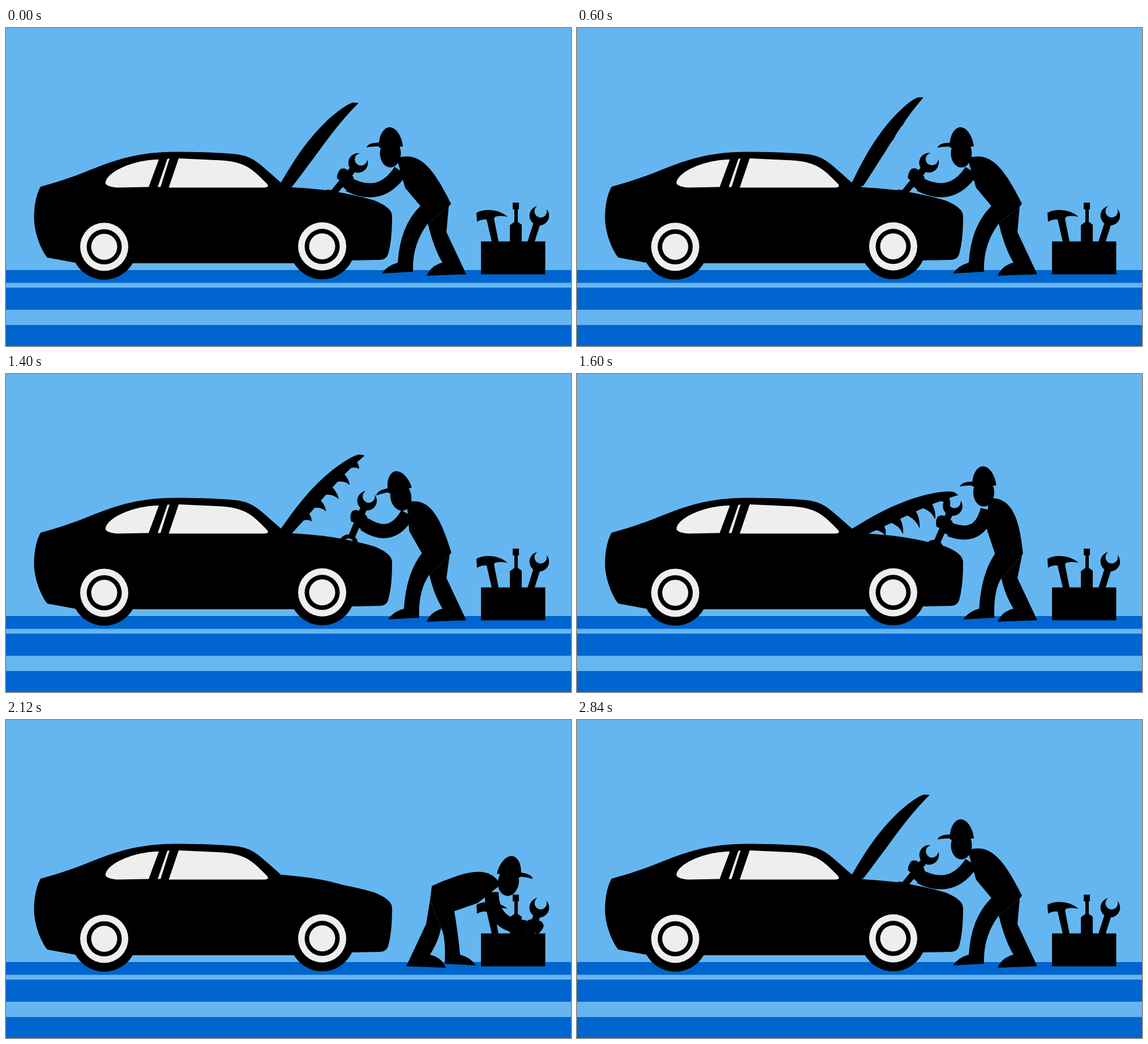
These frames come from a looping animation (998 by 561 pixels, 2.88 s). An HTML page:

```html
<!DOCTYPE html>
<html lang="en">
<head>
<meta charset="utf-8">
<title>Car repair</title>
<style>
  html, body { margin: 0; width: 100%; height: 100%; overflow: hidden; background: #65b6f0; }
  svg { display: block; width: 100%; height: 100%; }
  .road { fill: #0065ce; }
  .light { fill: #eee; }
</style>
</head>
<body>
<svg viewBox="0 0 998 561">
  <defs>
    <g id="wrench">
      <path d="M-8.6 -15A17.3 17.3 0 1 0 8.6 -15A11 11 0 1 1 -8.6 -15Z"/>
      <path d="M-6 13H6V69H-6Z"/>
      <circle cy="83" r="13.2" fill="none" stroke="#000" stroke-width="7"/>
    </g>
    <g id="wheel">
      <circle r="58"/>
      <circle r="42.5" class="light"/>
      <circle r="31"/>
      <circle r="23" class="light"/>
    </g>
  </defs>

  <rect width="998" height="561" fill="#65b6f0"/>
  <path class="road" d="M0 427H998V449.500H0ZM0 458H998V497H0ZM0 524H998V561H0Z"/>

  <path d="M61 280C105 268 130 258 160 246C205 228 250 218 300 218.500C340 218.500 380 220 405 222.500
    C440 226 450 243 489 275.500L505 281C550 283 600 289 650 304C668 311 682 320 682 332C682 365 679 385 675 399
    Q672 408 662 409L612 410L509 415H225L122 414L73 405C62 392 49 360 49.500 333Q50 300 61 280Z"/>
  <path class="light" d="M176 271C180 254 222 233 270 232L252 280.500L196 281.500C182 280 174 277 176 271Z
    M285 231L289 230L273 280.500H268ZM305 230L370 233C420 235 432 245 461 275Q466 281 457 281.500H287.500Z"/>
  <use href="#wheel" x="173.500" y="386"/>
  <use href="#wheel" x="558.500" y="385.300"/>

  <g id="hood">
    <path d="M0 -1C25 -7 50 -13 80 -16.500C105 -19 130 -20 153 -17C172 -15 187 -11 191.500 -7L197 0
      C150 -1 113 5 75 10C50 13 30 16 9 18L0 10Z"/>
    <path id="teeth"/>
  </g>

  <path d="M839 376.500H952.500V434.500H839Z"/>
  <path d="M831 326Q840 321 852 321Q872 321 886 333Q872 330 864 333L862 336L870 377H858L849 338Q840 337 832 342Z"/>
  <path d="M895 308H906V320H904V342L911 347V377H890V348L898 342V320H895Z"/>
  <use href="#wrench" transform="translate(942 331) rotate(17.500)"/>

  <g id="man">
    <path id="torso"/>
    <path id="frontLeg"/>
    <path id="backLeg"/>
    <path id="arm" fill="none" stroke="#000" stroke-width="25"/>
    <g id="head">
      <ellipse rx="18.500" ry="25"/>
      <path d="M-20 -10C-22 -30 -12 -46 -1 -46C13 -45 21 -25 22 -12L-18 -10Z"/>
      <path d="M-42 -10C-40 -17 -31 -19 -17 -19V-12C-28 -12 -35 -12 -42 -10Z"/>
    </g>
    <g id="tool">
      <use href="#wrench"/>
      <path d="M-17 28Q-13 21 -6 22L8 24Q16 28 17 38L14 50H3L-1 44L-11 45Q-18 38 -17 28Z"/>
    </g>
  </g>
</svg>

<script>
const LOOP = 2880;
const MIRROR = 'translate(1520 0) scale(-1 1)';
const set = (id, name, value) => document.getElementById(id).setAttribute(name, value);
const place = ([x, y, angle]) => `translate(${x} ${y}) rotate(${angle})`;

const linear = p => p;
const smooth = p => (1 - Math.cos(Math.PI * p)) / 2;
const speedUp = p => p * p;

function mix(a, b, p) {
  if (typeof a === 'number') return a + (b - a) * p;
  if (Array.isArray(a)) return a.map((v, i) => mix(v, b[i], p));
  return Object.fromEntries(Object.keys(a).map(k => [k, mix(a[k], b[k], p)]));
}

// Head and tool are x, y, angle; foot is the x of the front toe.
const working = { head: [679, 221, 0], tool: [622, 238, 39.5], hip: [759, 312], foot: 664 };
const leaning = { head: [666, 228, -28], tool: [599, 209, 22.6], hip: [757, 314], foot: 664 };
const recoiling = { head: [718, 209, 0], tool: [663, 233, 23.6], hip: [763, 317], foot: 682 };
const standing = { head: [741, 201, 0], tool: [689, 236, 13.3], hip: [764, 317], foot: 693 };
const bending = { head: [632.5, 285.5, -7], tool: [578, 331, -17.5], hip: [748, 315], foot: 690 };
const upright = mix(working, standing, 1.25);

// Each key: time, value, easing on the way to that value.
const manTrack = [
  [0, working], [290, leaning, smooth], [570, working, smooth], [1000, leaning, smooth],
  [1140, leaning], [1600, recoiling, smooth], [1680, upright], [2100, bending, smooth],
  [2140, bending], [2400, upright, smooth], [2520, standing], [2840, working, smooth], [LOOP, working]
];
const hoodTrack = [
  [0, -46], [1000, -52.5, smooth], [1140, -52.5], [1800, 18.5, speedUp],
  [2240, 18.5], [2480, -46, smooth], [LOOP, -46]
];
const teethTrack = [[0, 0], [500, 0], [1600, 1, p => p ** 1.5], [2000, 1], [2001, 0], [LOOP, 0]];

function sample(track, t) {
  const i = track.findIndex(key => key[0] > t);
  const [t0, a] = track[i - 1], [t1, b, ease = linear] = track[i];
  return mix(a, b, ease((t - t0) / (t1 - t0)));
}

function tooth(i, size) {
  const x = 43 + 31 * i, base = 13 - 3.5 * i;
  const tip = x + 9 * size, h = (29 - 3.2 * (i - 2) ** 2) * size;
  return `M${x - 6} ${base}Q${tip - 2} ${base + 0.35 * h} ${tip} ${base + h}` +
    `Q${tip + 6} ${base + 0.5 * h} ${x + 12} ${base - 3}Z`;
}

const shift = ([x, y], dx, dy) => [x + dx, y + dy];

// Point at a distance along the direction u and to its right.
const offset = ([x, y], [ux, uy], along, right) => [x + ux * along - uy * right, y + uy * along + ux * right];

function direction([x0, y0], [x1, y1]) {
  const length = Math.hypot(x1 - x0, y1 - y0);
  return [(x1 - x0) / length, (y1 - y0) / length];
}

function drawMan({ head, tool, hip, foot }) {
  set('head', 'transform', place(head));
  set('tool', 'transform', place(tool));

  // The torso keeps its shape along the spine; the belt tips when he leans far.
  const neck = shift(offset(head, direction(head, hip), 8, 0), 6, 3);
  const spine = direction(hip, neck), lean = -spine[0];
  const onSpine = (along, back) => offset(hip, spine, along, back);
  const tip = lean ** 6, half = 22 + 8 * lean;
  const beltX = half * Math.cos(tip), beltY = half * Math.sin(tip);
  const front = shift(hip, -beltX, beltY), seat = shift(hip, 23, 3);
  set('torso', 'd', `M${neck}C${onSpine(92, 43)} ${onSpine(44, 36)} ${shift(hip, beltX, -beltY)}` +
    `L${seat}L${front}L${onSpine(58, -22)}Z`);

  // The elbow sags below the line from shoulder to wrist.
  const shoulder = onSpine(86, -9), angle = tool[2] * Math.PI / 180;
  const wrist = offset(tool, [-Math.sin(angle), Math.cos(angle)], 40, -12);
  const middle = mix(shoulder, wrist, 0.5);
  const elbow = offset(middle, direction(shoulder, wrist), 0, -42);
  set('arm', 'd', `M${shoulder}Q${elbow} ${wrist}`);

  const stride = foot - 664, crotch = [745 + stride / 4, 345 + stride * 0.85];
  const legTop = `${crotch}L${seat}L${onSpine(12, 0)}L${front}Z`;
  set('frontLeg', 'd', `M${front}Q${foot + 32} ${front[1] + 35} ${foot + 28} 414` +
    `Q${foot + 9} 419 ${foot} 433L${foot + 55} 430Q${foot + 53} 382 ${legTop}`);
  set('backLeg', 'd', `M${seat}L778 360L813 434.5L743 437Q750 419 771 414Q756 390 ${legTop}`);
}

function draw() {
  const t = performance.now() % LOOP;
  const size = sample(teethTrack, t);
  drawMan(sample(manTrack, t));
  set('man', 'transform', t >= 1680 && t < 2400 ? MIRROR : '');
  set('hood', 'transform', place([486, 274, sample(hoodTrack, t)]));
  set('teeth', 'd', size ? Array.from({ length: 5 }, (_, i) => tooth(i, size)).join('') : '');
  requestAnimationFrame(draw);
}
draw();
</script>
</body>
</html>
```
